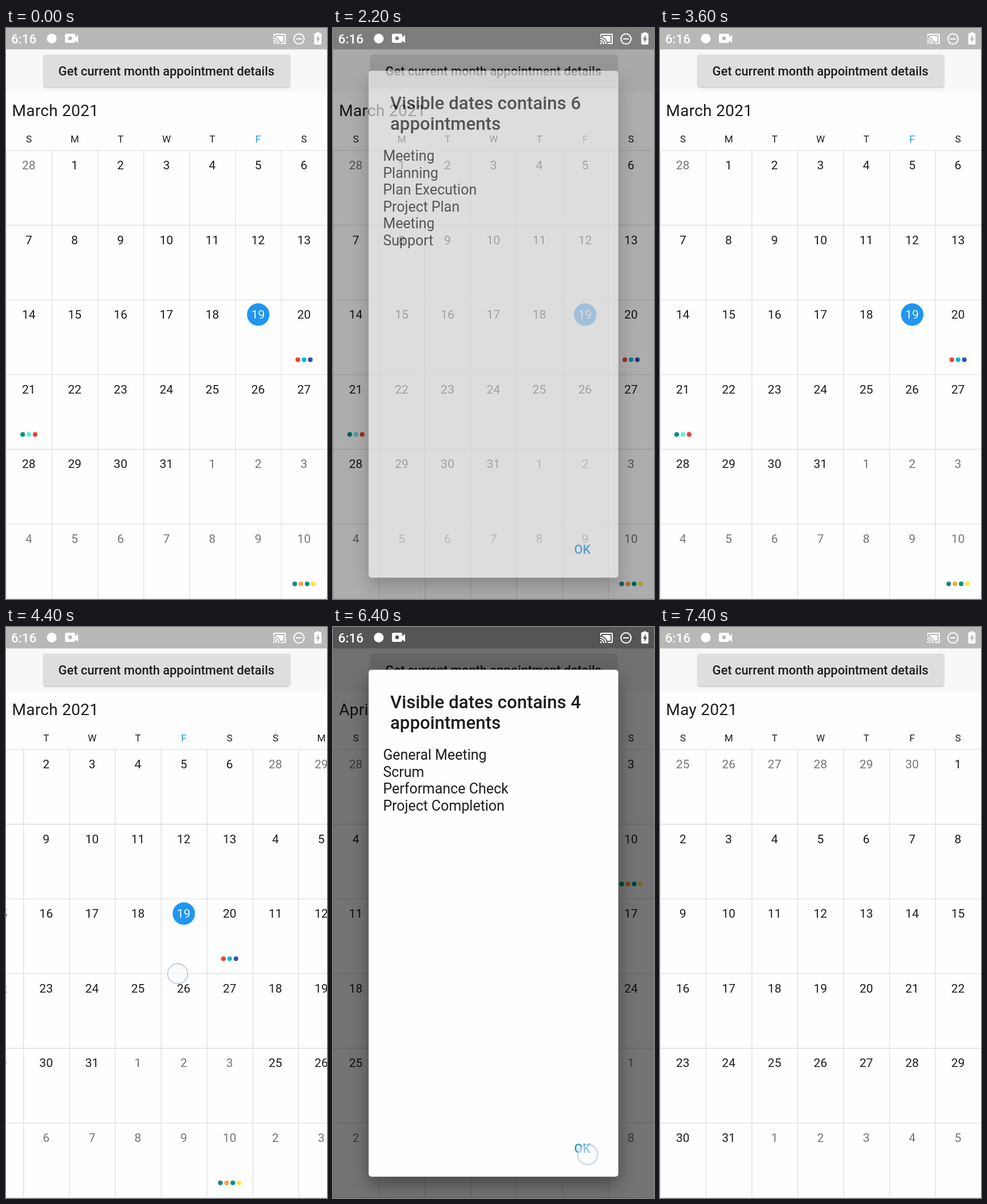
Write an HTML page that moves like this. It is 561 by 998 pixels and loops after 8000 ms.

```html
<!DOCTYPE html>
<html lang="en">
<head>
<meta charset="utf-8">
<title>Month calendar</title>
<style>
  html, body { margin: 0; width: 100%; height: 100%; overflow: hidden; background: #fdfefd; }
  svg { display: block; width: 561px; height: 998px; font-family: Roboto, sans-serif; fill: #1d1d1d; }
  .mid { text-anchor: middle; }
  .bold { font-weight: 500; }
  .title { font-size: 28.05px; letter-spacing: .25px; }
  .week { font-size: 17.1px; }
  .day { font-size: 21px; }
  .out { fill: #767676; }
  .grid { stroke: #dadbda; stroke-width: 1.1; fill: none; }
  .icon { fill: #fff; }
  #button { filter: drop-shadow(0 1.5px 1.5px rgba(0, 0, 0, .28)); }
  .sheet { filter: drop-shadow(0 14px 16px rgba(0, 0, 0, .38)); }
  .list { font-size: 24.93px; }

  /* 8 s loop at ten steps a second: 1.25% is one step */
  .strip, .title, .shade, .dialog, #touch { animation: 8s step-end infinite; }
  .title, .dialog, .shade, #touch { opacity: 0; }
  .strip { animation-name: slide; }
  .title0 { animation-name: title0; }
  .title1 { animation-name: title1; }
  .title2 { animation-name: title2; }
  .dialog0 { animation-name: dialog0; }
  .dialog1 { animation-name: dialog1; }
  .shade { animation-name: shade; }
  #touch { animation-name: touch; }

  @keyframes slide {
    0%     { transform: translateX(0); }
    53.75% { transform: translateX(-30px); }
    55%    { transform: translateX(-130px); }
    56.25% { transform: translateX(-290px); }
    57.5%  { transform: translateX(-440px); }
    58.75% { transform: translateX(-540px); }
    60%    { transform: translateX(-561px); }
    88.75% { transform: translateX(-640px); }
    90%    { transform: translateX(-880px); }
    91.25% { transform: translateX(-1070px); }
    92.5%, 100% { transform: translateX(-1122px); }
  }
  @keyframes title0 { 0% { opacity: 1; } 60%, 100% { opacity: 0; } }
  @keyframes title1 { 0% { opacity: 0; } 60% { opacity: 1; } 92.5%, 100% { opacity: 0; } }
  @keyframes title2 { 0% { opacity: 0; } 92.5%, 100% { opacity: 1; } }
  @keyframes dialog0 {
    0% { opacity: 0; } 27.5% { opacity: .6; } 28.75% { opacity: 1; }
    43.75% { opacity: .5; } 45%, 100% { opacity: 0; }
  }
  @keyframes dialog1 {
    0% { opacity: 0; } 68.75% { opacity: .6; } 70% { opacity: 1; }
    82.5% { opacity: .5; } 83.75%, 100% { opacity: 0; }
  }
  @keyframes shade {
    0% { opacity: 0; } 27.5% { opacity: .32; } 28.75% { opacity: .54; }
    43.75% { opacity: .27; } 45% { opacity: 0; }
    68.75% { opacity: .32; } 70% { opacity: .54; }
    82.5% { opacity: .27; } 83.75%, 100% { opacity: 0; }
  }
  @keyframes touch {
    0%     { opacity: 0; transform: translate(368px, 70px); }
    15%    { opacity: 1; transform: translate(368px, 70px); }
    18.75% { opacity: .5; }
    20%    { opacity: 0; }
    40%    { opacity: 1; transform: translate(440px, 912px); }
    43.75% { opacity: 0; }
    52.5%  { opacity: 1; transform: translate(430px, 610px); }
    53.75% { transform: translate(400px, 608px); }
    55%    { transform: translate(300px, 606px); }
    56.25% { transform: translate(140px, 604px); }
    57.5%  { opacity: 0; }
    65%    { opacity: 1; transform: translate(319px, 72px); }
    68.75% { opacity: 0; }
    78.75% { opacity: 1; transform: translate(445px, 922px); }
    82.5%  { opacity: 0; }
    87.5%  { opacity: 1; transform: translate(430px, 610px); }
    88.75% { transform: translate(351px, 608px); }
    90%    { transform: translate(111px, 606px); }
    91.25%, 100% { opacity: 0; }
  }
</style>
</head>
<body>
<svg viewBox="0 0 561 998">
  <rect width="561" height="998" fill="#fdfefd"/>
  <rect y="37" width="561" height="75" fill="#f7f8f7"/>
  <rect id="button" x="66" y="47" width="430" height="56" rx="3" fill="#dddedd"/>
  <text class="mid bold" x="280.3" y="82.5" font-size="21.81">Get current month appointment details</text>
  <g id="titles"></g>
  <g id="strip" class="strip"></g>
  <rect width="561" height="37.4" fill="#b8b9b7"/>
  <rect class="shade" width="561" height="998" fill="#000"/>

  <g class="icon">
    <text class="bold" x="9" y="27.3" font-size="22.5">6:16</text>
    <circle cx="80" cy="18.5" r="8.5"/>
    <path fill-rule="evenodd" d="M106 10h12q3 0 3 3v3l5-4v14l-5-4v1q0 3-3 3h-12q-3 0-3-3v-10q0-3 3-3zM112 14.6a3.4 3.4 0 1 0 .1 0z"/>
    <path transform="translate(466 7)" d="M1 18v3h3c0-1.66-1.34-3-3-3zm0-4v2c2.76 0 5 2.24 5 5h2c0-3.87-3.13-7-7-7zm18-7H5v1.63c3.96 1.28 7.09 4.41 8.37 8.37H19V7zM1 10v2c4.97 0 9 4.03 9 9h2c0-6.08-4.93-11-11-11zm20-7H3c-1.1 0-2 .9-2 2v3h2V5h18v14h-7v2h7c1.1 0 2-.9 2-2V5c0-1.1-.9-2-2-2z"/>
    <path d="M512 10.2a8.8 8.8 0 1 0 .1 0zM507 19h10" fill="none" stroke="#fff" stroke-width="2"/>
    <path fill-rule="evenodd" d="M542.5 9v-1.5h5V9h2q1.8 0 1.8 1.8v16.4q0 1.8-1.8 1.8h-9q-1.8 0-1.8-1.8V10.8q0-1.8 1.8-1.8zM546.3 12l-4.6 8h2.6v6l4.6-8h-2.6z"/>
  </g>

  <g id="dialogs"></g>
  <g id="touch">
    <circle r="17.5" fill="#f6f7fb" fill-opacity=".55" stroke="#a9b8da" stroke-opacity=".7" stroke-width="1.8"/>
  </g>
</svg>
<script>
  const COL = 561 / 7, ROW = 130.6, TOP = 214;
  const RED = '#ea4336', TEAL = '#079184';
  const TODAY = '2-19';
  const events = {
    '2-20': [RED, '#0cb9d0', '#3152ae'],
    '2-21': [TEAL, '#66ecd9', RED],
    '3-10': [TEAL, '#fca044', TEAL, '#fde745']
  };
  const dialogs = [
    ['Meeting', 'Planning', 'Plan Execution', 'Project Plan', 'Meeting', 'Support'],
    ['General Meeting', 'Scrum', 'Performance Check', 'Project Completion']
  ];

  const text = (cls, x, y, str, extra = '') => `<text class="${cls}" x="${x}" y="${y}" ${extra}>${str}</text>`;
  const range = (n, fn) => Array.from({ length: n }, (_, i) => fn(i)).join('');

  function cell(date, month, i) {
    const x = (i % 7 + .5) * COL - .2, y = TOP + Math.floor(i / 7) * ROW;
    const key = `${date.getMonth()}-${date.getDate()}`;
    const dots = events[key] || [];
    const today = key === TODAY;
    return (today ? `<circle cx="${x + .2}" cy="${y + 25.6}" r="19.6" fill="#2095f1"/>` : '') +
      text('day mid' + (date.getMonth() === month ? '' : ' out'), x, y + 33, date.getDate(),
        today ? 'style="fill:#f4f9fd"' : '') +
      range(dots.length, k =>
        `<circle cx="${x + .2 + (k - (dots.length - 1) / 2) * 10.9}" cy="${y + 104.6}" r="4.1" fill="${dots[k]}"/>`);
  }

  function page(month, index) {
    const lead = new Date(2021, month, 1).getDay();
    const lines = range(7, i => `M0 ${TOP + i * ROW}H561`) + range(7, i => `M${i * COL + .4} ${TOP}V998`);
    return `<g transform="translate(${index * 561})"><path class="grid" d="${lines}"/>` +
      range(7, i => text('week mid', (i + .5) * COL, 200, 'SMTWTFS'[i],
        month === 2 && i === 5 ? 'style="fill:#1c98de"' : '')) +
      range(42, i => cell(new Date(2021, month, 1 + i - lead), month, i)) + '</g>';
  }

  function dialog(items, index) {
    return `<g class="dialog dialog${index}">
      <rect class="sheet" x="62.3" y="74.8" width="436.3" height="886" rx="5" fill="#fdfefd"/>` +
      text('bold', 100, 142, `Visible dates contains ${items.length}`, 'font-size="31.16"') +
      text('bold', 100, 178, 'appointments', 'font-size="31.16"') +
      range(items.length, i => text('list', 87.4, 232 + i * 29.6, items[i])) +
      text('bold', 421.5, 918.7, 'OK', 'font-size="21.81" style="fill:#2794e4"') + '</g>';
  }

  const fill = (id, html) => document.getElementById(id).innerHTML = html;
  fill('titles', ['March', 'April', 'May'].map((m, i) => text(`title title${i}`, 10.4, 154, m + ' 2021')).join(''));
  fill('strip', [2, 3, 4].map(page).join(''));
  fill('dialogs', dialogs.map(dialog).join(''));
</script>
</body>
</html>
```
